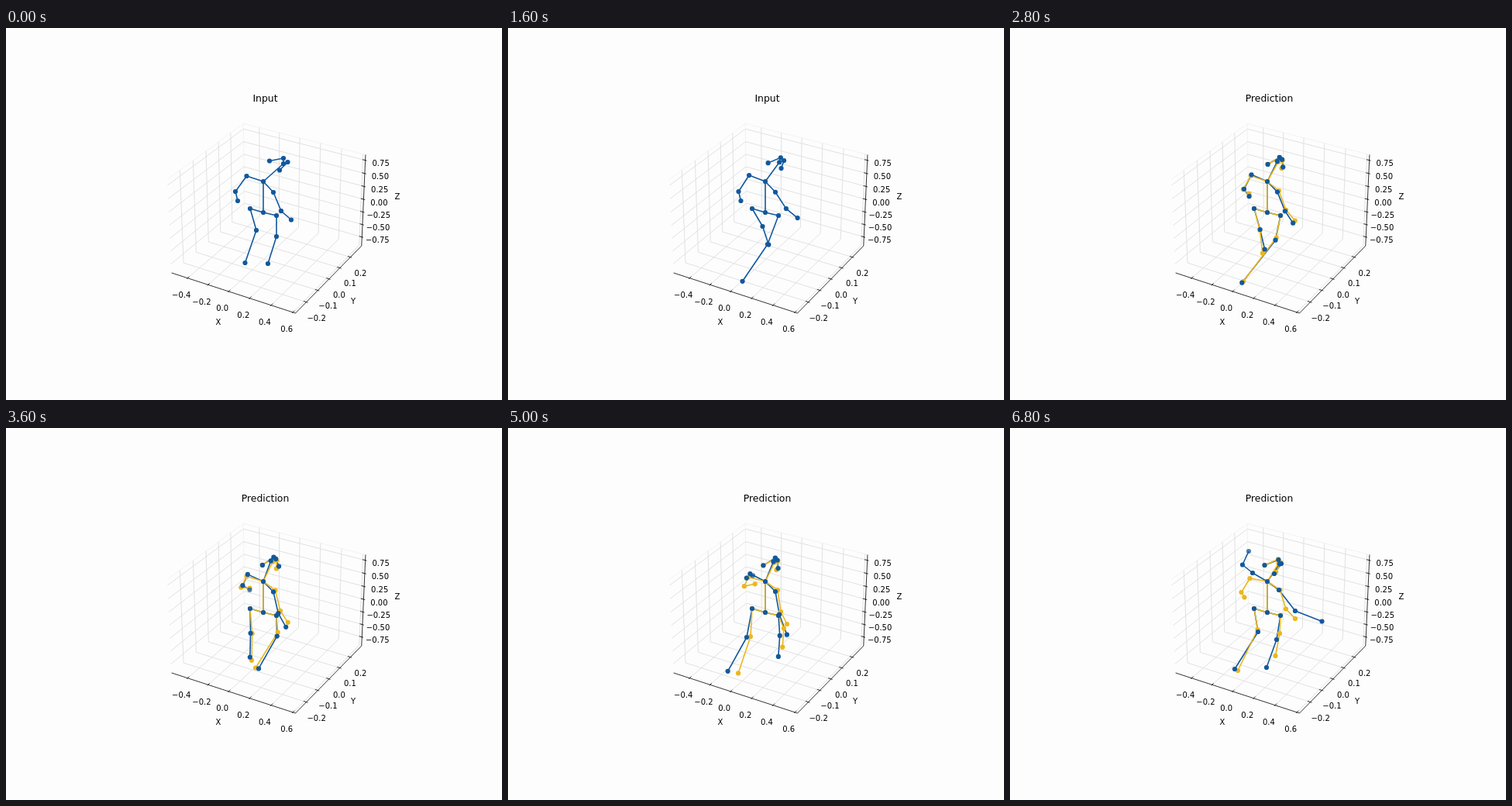
An HTML page with a canvas that plays this animation: 640x480 px, repeating every 7000 ms.

```html
<!DOCTYPE html>
<html lang="en">
<head>
<meta charset="utf-8">
<title>Pose prediction</title>
<style>
  html, body { margin: 0; width: 100%; height: 100%; overflow: hidden; background: #fdfdfd; }
  canvas { display: block; }
</style>
</head>
<body>
<canvas id="stage" width="640" height="480"></canvas>
<script>
const ctx = document.getElementById('stage').getContext('2d');
const STEP = 200, FRAMES = 35, INPUT_FRAMES = 10;
const BLUE = '#12589d', GOLD = '#ebb71c';

// ---- 3D axes: perspective view, elevation 30°, azimuth -60° ----

// a, b, c run from 0 to 1 along the x, y and z edges of the box
function project([a, b, c]) {
  const x = (a - 0.5) * 1.143, y = (b - 0.5) * 1.143, z = (c - 0.5) * 0.857;
  const scale = 1603 / (10 - (0.433 * x - 0.75 * y + 0.5 * z));
  return [338.4 + scale * (0.866 * x + 0.5 * y),
          240 - scale * (-0.25 * x + 0.433 * y + 0.866 * z)];
}

function polyline(points, color, width) {
  ctx.strokeStyle = color;
  ctx.lineWidth = width;
  ctx.beginPath();
  for (const [x, y] of points) ctx.lineTo(x, y);
  ctx.stroke();
}

function label(text, x, y, size = 10) {
  ctx.font = `${size}px "DejaVu Sans", sans-serif`;
  ctx.fillStyle = '#000';
  ctx.textAlign = 'center';
  ctx.fillText(text, x, Math.round(y + size * 0.365));
}

const AXES = [
  { name: 'X', nameAt: [274, 379], min: -0.56, max: 0.623, first: -0.4, step: 0.2, count: 6,
    digits: 1, offset: [-8.2, 21.6], at: (u, out) => [u, -out, 0],
    grid: u => [[u, 0, 0], [u, 1, 0], [u, 1, 1]] },
  { name: 'Y', nameAt: [448, 352], min: -0.292, max: 0.308, first: -0.2, step: 0.1, count: 5,
    digits: 1, offset: [13, 20.3], at: (u, out) => [1 + out, u, 0],
    grid: u => [[1, u, 0], [0, u, 0], [0, u, 1]] },
  { name: 'Z', nameAt: [505, 217], min: -0.93, max: 0.855, first: -0.75, step: 0.25, count: 7,
    digits: 2, offset: [20, 3.8], at: (u, out) => [1 + out, 1, u],
    grid: u => [[0, 0, u], [0, 1, u], [1, 1, u]] }
];

function eachTick(action) {
  for (const axis of AXES) {
    for (let i = 0; i < axis.count; i++) {
      const value = axis.first + i * axis.step;
      action(axis, (value - axis.min) / (axis.max - axis.min), value);
    }
  }
}

function drawAxes() {
  const line = (points, color, width = 0.8) => polyline(points.map(project), color, width);
  line([[0, 0, 1], [0, 1, 1], [1, 1, 1]], '#f0f0f0');
  line([[0, 1, 0], [0, 1, 1]], '#f0f0f0');
  eachTick((axis, u) => line(axis.grid(u), '#e0e0e0', 0.95));

  line([[0, 0, 0], [1, 0, 0], [1, 1, 0], [1, 1, 1]], '#000');
  eachTick((axis, u, value) => {
    line([axis.at(u, 1 / 90), axis.at(u, -1 / 45)], '#000');
    const [x, y] = project(axis.at(u, 0));
    const sign = value < -1e-6 ? '\u2212' : '';
    label(sign + Math.abs(value).toFixed(axis.digits), x + axis.offset[0], y + axis.offset[1]);
  });
  for (const axis of AXES) label(axis.name, ...axis.nameAt);
}

// ---- Motion: each joint eases between a few turning points [frame, x, y] ----

// Flat at a turning point, otherwise the slope between its neighbours
function slope(points, i, axis) {
  const rate = (a, b) => (b[axis] - a[axis]) / (b[0] - a[0]);
  const before = points[i - 1], here = points[i], after = points[i + 1];
  if (!before) return rate(here, after);
  if (!after) return rate(before, here);
  return rate(before, here) * rate(here, after) <= 0 ? 0 : rate(before, after);
}

function swing(...points) {
  return frame => {
    let i = 0;
    while (i < points.length - 2 && frame > points[i + 1][0]) i++;
    const p = points[i], q = points[i + 1];
    const h = q[0] - p[0], t = (frame - p[0]) / h, s = 1 - t;
    return [1, 2].map(axis =>
      s * s * (1 + 2 * t) * p[axis] + t * t * (3 - 2 * t) * q[axis]
      + h * t * s * (s * slope(points, i, axis) - t * slope(points, i + 1, axis)));
  };
}

const fixed = (x, y) => () => [x, y];

// The head turns back during the first part and nods during the last.
const turn = frame => Math.max(0, 1 - frame / 21) ** 1.2;
const nod = frame => Math.max(0, (frame - 21) / 13);
const goldNod = frame => 0.8 * (frame - 9) / 25;

function makeHead(nodding) {
  const joint = (x, y, turnX, turnY, nodX, nodY) => frame => [
    x + turnX * turn(frame) + nodX * nodding(frame),
    y + turnY * turn(frame) + nodY * nodding(frame)
  ];
  return {
    nose: joint(340, 171, 18, 4, 8, 4.5),
    eyeL: joint(344, 166.5, 14, 1.5, 2.5, 3.5),
    earL: joint(330, 177.5, 10, -6, -1.5, -0.5),
    eyeR: joint(346.5, 168.5, 17, 4.5, 3.5, 6.5),
    earR: joint(352, 178, 1, 5.5, -11, 10)
  };
}

const trunk = {
  neck: fixed(332, 198), pelvis: fixed(332, 238),
  hipL: fixed(315, 233), hipR: fixed(349, 242)
};

const body = {
  ...trunk,
  ...makeHead(nod),
  kneeL: swing([0, 323, 261], [8, 328.5, 256], [25, 308, 270], [34, 320, 263]),
  footL: swing([0, 308.5, 303], [9, 337, 279], [21, 304, 303], [29, 270, 320.5], [34, 290, 311]),
  kneeR: swing([0, 349, 269], [8, 335, 279], [21, 352, 267], [34, 344, 273]),
  footR: swing([0, 338, 304], [12, 294.5, 332], [23, 350, 294], [34, 331, 309]),
  shoulderL: swing([0, 310.5, 191], [34, 313, 187]),
  elbowL: swing([0, 296, 211], [8, 297.5, 211], [24, 308, 195], [34, 300, 176.5]),
  wristL: swing([0, 299, 223], [8, 300.5, 223], [22, 317, 199], [34, 308, 159]),
  shoulderR: swing([0, 345, 212], [25, 345, 211], [34, 347, 209]),
  elbowR: swing([0, 355, 236], [7, 359, 233], [23, 349, 241], [34, 368, 236]),
  wristR: swing([0, 368, 247.5], [5, 375.3, 244], [19, 361, 258], [26, 362, 267], [34, 402.5, 249.5])
};

// The gold figure leaves the blue one at the end of the input phase.
function branch(joint, ...points) {
  const start = INPUT_FRAMES - 1;
  return swing([start, ...body[joint](start)], ...points);
}

const goldBody = {
  ...trunk,
  ...makeHead(goldNod),
  kneeL: branch('kneeL', [25, 313, 269], [34, 319.5, 260]),
  footL: branch('footL', [21, 310, 306.5], [29, 289, 322], [34, 294, 313]),
  kneeR: branch('kneeR', [24, 356, 258.5], [34, 348, 265]),
  footR: branch('footR', [11, 295, 332], [26, 355, 282], [34, 342.5, 294]),
  shoulderL: branch('shoulderL', [34, 309.5, 194]),
  elbowL: branch('elbowL', [24, 305, 204], [34, 298.5, 212]),
  wristL: branch('wristL', [24, 319, 201], [34, 302.5, 218.5]),
  shoulderR: branch('shoulderR', [14, 347, 210], [34, 348.5, 209]),
  elbowR: branch('elbowR', [25, 352, 237], [34, 356, 233.5]),
  wristR: branch('wristR', [25, 360, 253], [34, 368, 246])
};

// ---- Figures ----
const CHAINS = [
  'footL kneeL hipL pelvis hipR kneeR footR',
  'wristL elbowL shoulderL neck shoulderR elbowR wristR',
  'pelvis neck nose eyeL earL',
  'nose eyeR earR'
].map(chain => chain.split(' '));

function drawBones(figure, frame, color) {
  ctx.lineJoin = 'round';
  for (const chain of CHAINS) polyline(chain.map(joint => figure[joint](frame)), color, 1.6);
}

function drawJoints(figure, frame, color, farWrist) {
  ctx.fillStyle = color;
  for (const [name, place] of Object.entries(figure)) {
    ctx.globalAlpha = farWrist && name === 'wristL' ? 0.75 : 1;
    ctx.beginPath();
    ctx.arc(...place(frame), 3.1, 0, 2 * Math.PI);
    ctx.fill();
  }
  ctx.globalAlpha = 1;
}

function draw(frame) {
  const predicting = frame >= INPUT_FRAMES;
  ctx.fillStyle = '#fdfdfd';
  ctx.fillRect(0, 0, 640, 480);
  drawAxes();
  label(predicting ? 'Prediction' : 'Input', 334.5, 90.5, 12.4);
  drawBones(body, frame, BLUE);
  if (predicting) {
    drawBones(goldBody, frame, GOLD);
    drawJoints(goldBody, frame, GOLD, false);
  }
  drawJoints(body, frame, BLUE, frame >= 18);
}

const startTime = performance.now();
function tick() {
  draw(Math.floor((performance.now() - startTime) / STEP) % FRAMES);
  requestAnimationFrame(tick);
}
tick();
</script>
</body>
</html>
```
